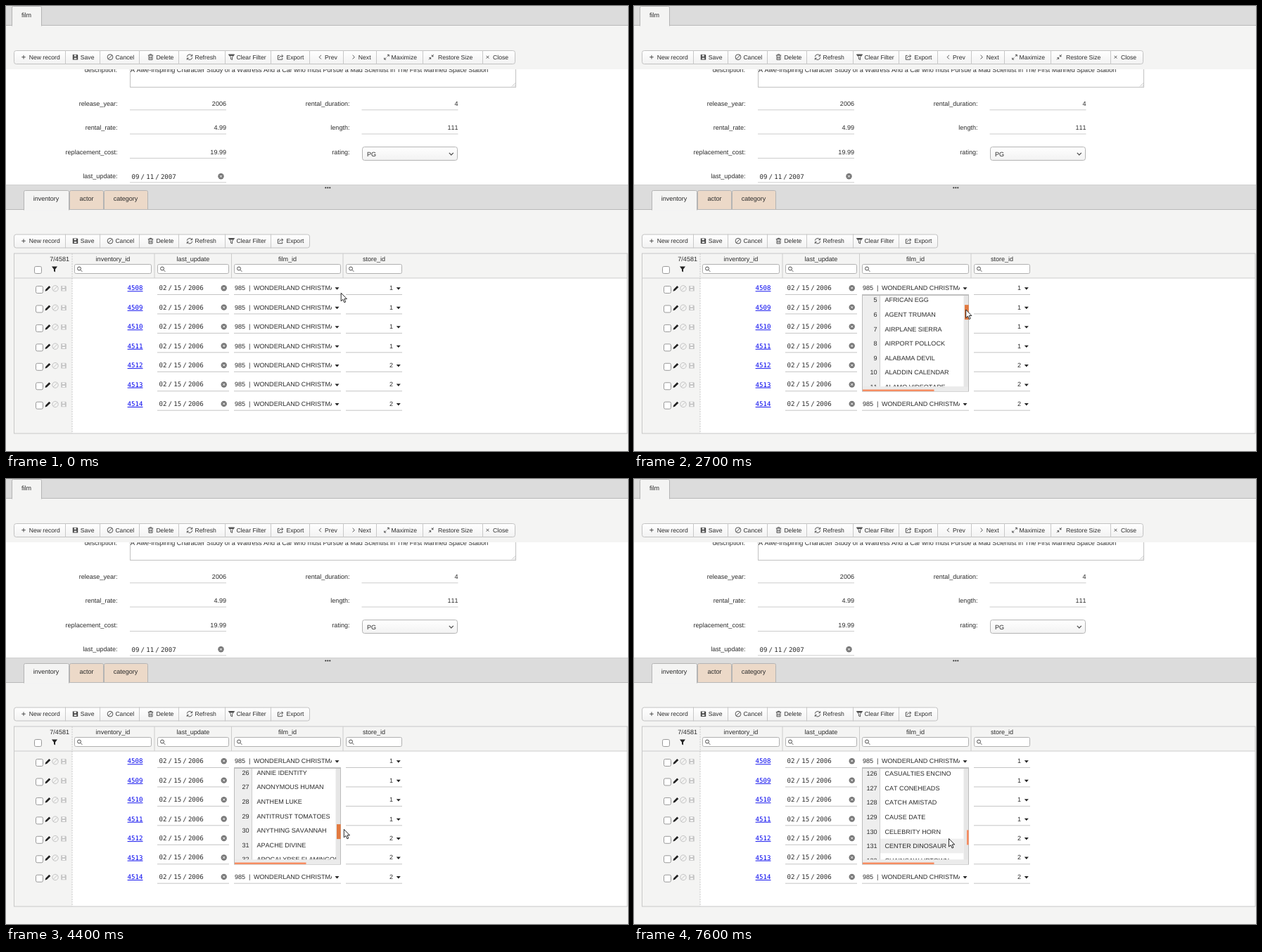
Write an HTML page that moves like this. It is 884x633 px and loops after 8000 ms.

```html
<!DOCTYPE html>
<html lang="en">
<head>
<meta charset="utf-8">
<title>film</title>
<style>
  html, body { margin: 0; width: 100%; height: 100%; overflow: hidden; background: #f4f4f3; }
  svg { display: block; font: 9.05px "Liberation Sans", Arial, sans-serif; font-kerning: none; fill: #2b2b2b; text-rendering: geometricPrecision; }
  text { white-space: pre; }
  .mono { font-family: "DejaVu Sans Mono", monospace; font-size: 9.1px; }
  .link { fill: #00e; text-decoration: underline; }
  .btn { font-size: 8.65px; }
  .ico { fill: none; stroke: #444; stroke-width: 1; }
  .dim { fill: none; stroke: #c4c4c4; stroke-width: 1; }
</style>
</head>
<body>
<svg id="stage" width="884" height="633" viewBox="0 0 884 633">
  <defs>
    <linearGradient id="shade" x2="0" y2="1"><stop stop-color="#fff"/><stop offset="1" stop-color="#f2f2f2"/></linearGradient>
    <clipPath id="form"><rect y="90" width="884" height="165"/></clipPath>
    <clipPath id="combo"><rect x="324" y="388" width="139" height="220"/></clipPath>
    <clipPath id="view"><rect x="325" y="412" width="144" height="129.5"/></clipPath>
  </defs>
</svg>
<script>
const ROW = 20.6, TOP = 412, LOOP = 8000;
const titles = `ACADEMY DINOSAUR,ACE GOLDFINGER,ADAPTATION HOLES,AFFAIR PREJUDICE,AFRICAN EGG,AGENT TRUMAN,AIRPLANE SIERRA,AIRPORT POLLOCK,ALABAMA DEVIL,ALADDIN CALENDAR,ALAMO VIDEOTAPE,ALASKA PHANTOM,ALI FOREVER,ALICE FANTASIA,ALIEN CENTER,ALLEY EVOLUTION,ALONE TRIP,ALTER VICTORY,AMADEUS HOLY,AMELIE HELLFIGHTERS,AMERICAN CIRCUS,AMISTAD MIDSUMMER,ANACONDA CONFESSIONS,ANALYZE HOOSIERS,ANGELS LIFE,ANNIE IDENTITY,ANONYMOUS HUMAN,ANTHEM LUKE,ANTITRUST TOMATOES,ANYTHING SAVANNAH,APACHE DIVINE,APOCALYPSE FLAMINGOS,APOLLO TEEN,ARABIA DOGMA,ARACHNOPHOBIA ROLLERCOASTER,ARGONAUTS TOWN,ARIZONA BANG,ARK RIDGEMONT,ARMAGEDDON LOST,ARMY FLINTSTONES,ARSENIC INDEPENDENCE,ARTIST COLDBLOODED,ATLANTIS CAUSE,ATTACKS HATE,ATTRACTION NEWTON,AUTUMN CROW,BABY HALL,BACKLASH UNDEFEATED,BADMAN DAWN,BAKED CLEOPATRA,BALLOON HOMEWARD,BALLROOM MOCKINGBIRD,BANG KWAI,BANGER PINOCCHIO,BARBARELLA STREETCAR,BAREFOOT MANCHURIAN,BASIC EASY,BEACH HEARTBREAKERS,BEAR GRACELAND,BEAST HUNCHBACK,BEAUTY GREASE,BED HIGHBALL,BEDAZZLED MARRIED,BEETHOVEN EXORCIST,BEHAVIOR RUNAWAY,BENEATH RUSH,BERETS AGENT,BETRAYED REAR,BEVERLY OUTLAW,BIKINI BORROWERS,BILKO ANONYMOUS,BILL OTHERS,BINGO TALENTED,BIRCH ANTITRUST,BIRD INDEPENDENCE,BIRDCAGE CASPER,BIRDS PERDITION,BLACKOUT PRIVATE,BLADE POLISH,BLANKET BEVERLY,BLINDNESS GUN,BLOOD ARGONAUTS,BLUES INSTINCT,BOILED DARES,BONNIE HOLOCAUST,BOOGIE AMELIE,BOONDOCK BALLROOM,BORN SPINAL,BORROWERS BEDAZZLED,BOULEVARD MOB,BOUND CHEAPER,BOWFINGER GABLES,BRANNIGAN SUNRISE,BRAVEHEART HUMAN,BREAKFAST GOLDFINGER,BREAKING HOME,BRIDE INTRIGUE,BRIGHT ENCOUNTERS,BRINGING HYSTERICAL,BROOKLYN DESERT,BROTHERHOOD BLANKET,BUBBLE GROSSE,BUCKET BROTHERHOOD,BUGSY SONG,BULL SHAWSHANK,BULWORTH COMMANDMENTS,BUNCH MINDS,BUTCH PANTHER,BUTTERFLY CHOCOLAT,CABIN FLASH,CADDYSHACK JEDI,CALENDAR GUNFIGHT,CALIFORNIA BIRDS,CAMELOT VACATION,CAMPUS REMEMBER,CANDIDATE PERDITION,CANDLES GRAPES,CANYON STOCK,CAPER MOTIONS,CARIBBEAN LIBERTY,CAROL TEXAS,CARRIE SONGS,CASABLANCA SUPER,CASPER DRAGONFLY,CASSIDY WYOMING,CASUALTIES ENCINO,CAT CONEHEADS,CATCH AMISTAD,CAUSE DATE,CELEBRITY HORN,CENTER DINOSAUR,CHAINSAW UPTOWN`.split(",");

// Drawing helpers; y of text is its visual middle.
const rect = (x, y, w, h, fill, extra = "") => `<rect x="${x}" y="${y}" width="${w}" height="${h}" fill="${fill}" ${extra}/>`;
const box = (x, y, w, h, fill, line = "#c2c2c2", r = 0) => rect(x + .5, y + .5, w - 1, h - 1, fill, `stroke="${line}" rx="${r}"`);
const line = (x1, y1, x2, y2, color = "#ccc", extra = "") => `<path d="M${x1} ${y1}L${x2} ${y2}" stroke="${color}" ${extra}/>`;
const text = (x, y, s, anchor = "start", cls = "") => `<text x="${x}" y="${y + 3.2}" text-anchor="${anchor}" class="${cls}">${s}</text>`;
const at = (x, y, s, cls = "ico", scale = 1) => `<g transform="translate(${x} ${y}) scale(${scale})" class="${cls}">${s}</g>`;
const path = (d, extra = "") => `<path d="${d}" ${extra}/>`;

const SOLID = 'fill="#444" stroke="none"';
const icons = {
  plus: path("M-3 0H3M0-3V3"),
  save: path("M-4-4H3L4-3V4H-4Z", SOLID) + rect(-2, -3.3, 3.6, 2.3, "#fff", 'stroke="none"') + rect(-2, 1, 4, 2, "#fff", 'stroke="none"'),
  ban: '<circle r="4.2"/>' + path("M-2.9 2.9L2.9-2.9"),
  trash: path("M-4-2.8H4M-1.5-3V-4.2H1.5V-3M-2.8-2.5V4H2.8V-2.5M-1-.8V2.5M1-.8V2.5"),
  refresh: path("M-4-.5A4 4 0 0 1 3.4-2.2M4 .5A4 4 0 0 1-3.4 2.2M4-4.2V-1.6H1.4M-4 4.2V1.6H-1.4"),
  filter: path("M-4.5-4H4.5L1.2 0V4L-1.2 3V0Z") + path("M-4-3.8H4L2.5-1.8H-2.5Z", SOLID),
  share: path("M-1.5-2.5H-4V3.8H3V1.5M-2 1.5C-1.5-1 0-1.6 3.5-1.6M1.8-3.8L4.2-1.6L1.8.6"),
  prev: path("M1.5-3L-1.5 0L1.5 3"),
  next: path("M-1.5-3L1.5 0L-1.5 3"),
  grow: path("M.8-.8L3.4-3.4M1-3.6H3.6V-1M-.8.8L-3.4 3.4M-1 3.6H-3.6V1"),
  shrink: path("M3.8-3.8L1-1M1-3.4V-1H3.4M-3.8 3.8L-1 1M-1 3.4V1H-3.4"),
  close: path("M-2-2L2 2M-2 2L2-2"),
  pencil: path("M-4 4L-3.2 1.4L1.8-3.6L3.8-1.6L-1.4 3.3Z", 'fill="#222" stroke="none"')
};
const clearIcon = (x, y) => `<circle cx="${x}" cy="${y}" r="4.2" fill="#777"/>` + at(x, y, path("M-1.5-1.5L1.5 1.5M-1.5 1.5L1.5-1.5", 'stroke="#fff"'));
const caret = (x, y, id = "") => path(`M${x - 3} ${y - 1}h6l-3 3.4Z`, `fill="#222" ${id}`);
const check = (x, y) => rect(x, y, 10, 10, "#fff", 'stroke="#999" rx="2"');
const date = (x, y, parts) => parts.map((p, i) => text(x + i * 20.7, y, p, "start", "mono") + (i < 2 ? text(x + 15.7 + i * 20.7, y, "/", "middle", "mono") : "")).join("");

// icon, label, right edge, icon x, label x
const buttons = [
  ["plus", "New record", 85, 25, 32.7], ["save", "Save", 134, 98.5, 105.8], ["ban", "Cancel", 190, 148, 155.4],
  ["trash", "Delete", 246, 205.5, 213.4], ["refresh", "Refresh", 312, 261, 268.6], ["filter", "Clear Filter", 377, 320.5, 327.4],
  ["share", "Export", 432, 390, 398.5], ["prev", "Prev", 480, 446.5, 453], ["next", "Next", 527, 494, 500.8],
  ["grow", "Maximize", 593, 541, 547.6], ["shrink", "Restore Size", 678, 604.5, 614], ["close", "Close", 724, 684.5, 692]
];
function toolbar(y, count) {
  const list = buttons.slice(0, count), end = list[count - 1][2];
  return box(11, y, end - 11, 20, "url(#shade)", "#c2c2c2", 3) + list.map(([ico, label, edge, ix, tx], i) =>
    (i < count - 1 ? line(edge - .5, y, edge - .5, y + 20, "#c8c8c8") : "") + at(ix, y + 9.7, icons[ico], "ico", .92) + text(tx, y + 9.6, label, "start", "btn")).join("");
}

const tab = (x1, x2, y, bottom, fill) => path(`M${x1 + .5} ${bottom}V${y + 2.5}q0-2 2-2H${x2 - 2.5}q2 0 2 2V${bottom}`, `fill="${fill}" stroke="#b4b4b4"`);
const field = (label, value, right, x, y) => text(right, y, label + ":", "end") + line(x, y + 9, x + 137, y + 9) + (value ? text(x + 137, y, value, "end") : "");

function page() {
  let s = rect(0, 0, 884, 633, "#f4f4f3") + rect(0, 0, 884, 27, "#dcdcdc") + line(0, 27.5, 884, 27.5, "#b8b8b8")
    + tab(8, 51, 0, 28.5, "#f4f4f3") + text(29, 12.5, "film", "middle") + toolbar(63, 12);

  s += rect(0, 90, 884, 164.5, "#fff") + `<g clip-path="url(#form)">` + box(176, 70, 549, 46, "#fff")
    + path("M719 114.5L724 109.5M722 114.5L724 112.5", 'stroke="#aaa" stroke-width=".7"') + text(158, 90.5, "description:", "end")
    + text(177, 91, "A Awe-Inspiring Character Study of a Waitress And a Car who must Pursue a Mad Scientist in The First Manned Space Station") + "</g>"
    + field("release_year", "2006", 158.5, 176, 138.8) + field("rental_rate", "4.99", 158.5, 176, 173)
    + field("replacement_cost", "19.99", 158.5, 176, 207.5) + field("last_update", "", 158.5, 176, 242)
    + field("rental_duration", "4", 488.5, 505.5, 138.8) + field("length", "111", 488.5, 505.5, 173)
    + text(488.5, 207.5, "rating:", "end") + box(506, 200, 136, 20, "url(#shade)", "#b4b4b4", 3) + text(513, 210.3, "PG")
    + path("M629.8 208.8L632.8 211.8L635.8 208.8", 'fill="none" stroke="#444" stroke-width="1.2"')
    + date(178.5, 242.5, ["09", "11", "2007"]) + clearIcon(305.5, 242.3);

  s += rect(0, 254.5, 884, 35.5, "#dcdcdc") + line(0, 254.5, 884, 254.5, "#d0d0d0")
    + [454.3, 457.3, 460.3].map(x => `<circle cx="${x}" cy="258.5" r="1.1"/>`).join("")
    + tab(90, 139, 262, 290, "#ecd9c8") + tab(139, 202, 262, 290, "#ecd9c8") + line(0, 289.5, 884, 289.5, "#b8b8b8")
    + tab(25, 90, 262, 290.5, "#f4f4f3")
    + [[57, "inventory"], [114.5, "actor"], [170, "category"]].map(([x, t]) => text(x, 273.6, t, "middle")).join("")
    + toolbar(324.5, 7);

  s += rect(94, 387, 789, 221, "#fff") + box(11, 351.5, 872.5, 257, "none", "#c8c8c8") + line(11, 387, 883, 387)
    + line(94, 352, 94, 608, "#c8c8c8", 'stroke-dasharray="2 1.5"')
    + [211, 320.5, 479].map(x => line(x, 352, x, 387)).join("")
    + text(90, 359.3, "7/4581", "end") + check(40.5, 370.5) + path("M65 370.5H73L70 374.5V378.5L68 377.2V374.5Z", 'fill="#222"')
    + [["inventory_id", 152, 97, 110], ["last_update", 266, 215, 102], ["film_id", 400, 324, 152], ["store_id", 523, 483, 80]].map(([t, mid, x, w]) =>
      text(mid, 359.3, t, "middle") + box(x, 367, w, 14, "#fff", "#b0b0b0", 2)
      + at(x + 7.5, 374, '<circle cx="-.5" cy="-.5" r="2.6"/>' + path("M1.5 1.5L4 4"), "ico", .95)).join("");

  for (let i = 0; i < 7; i++) {
    const y = 401 + i * 27.45;
    s += check(42.5, y - 2.5) + at(59.5, y + .7, icons.pencil) + at(70, y + .8, icons.ban, "dim")
      + at(82, y + .8, icons.save.replace("#444", "#c4c4c4"), "dim", .95)
      + text(194.5, y + .2, 4508 + i, "end", "mono link")
      + date(217.5, y, ["02", "15", "2006"]) + clearIcon(309.7, y + .2)
      + `<g clip-path="url(#combo)">${text(325, y, "985")}${text(346.2, y, "|", "middle")}${text(352, y, "WONDERLAND CHRISTMAS")}</g>`
      + caret(470.5, y + .3, i ? "" : 'id="arrow"') + text(550, y, i < 4 ? 1 : 2, "end") + caret(557.8, y + .3)
      + [[215, 317], [324, 476], [483, 563]].map(([a, b]) => line(a, y + 9.5, b, y + 9.5, "#c4c4c4")).join("");
  }
  return s;
}

const popup = () => `<g id="popup">` + box(324, 411, 152, 137.5, "#e6e6e6", "#bcbcbc")
  + rect(325, 412, 25, 129.5, "#eee") + rect(350, 412, 118.5, 129.5, "#fff") + line(349.5, 412, 349.5, 541.5, "#ccc")
  + `<g clip-path="url(#view)"><g id="list">` + rect(350, 0, 118.5, ROW, "#eee", 'id="hover"')
  + titles.map((t, i) => text(345.5, (i + .5) * ROW, i + 1, "end") + text(356.5, (i + .5) * ROW, t)).join("")
  + "</g></g>" + rect(325, 541.5, 150, 6.5, "#ebebeb") + rect(325, 545.5, 101.5, 2.5, "#f68d62") + rect(473, TOP, 2.7, 21, "#f68d62", 'id="thumb"') + "</g>";

const cursor = () => path("M0 0V11.6L2.7 9.2L4.6 13.5L6.5 12.7L4.6 8.5H8.2Z", 'id="cursor" fill="#fff" stroke="#111" stroke-width=".9"');

stage.insertAdjacentHTML("beforeend", page() + popup() + cursor());
const [arrow, popupEl, list, hover, thumb, cursorEl] = ["arrow", "popup", "list", "hover", "thumb", "cursor"].map(id => document.getElementById(id));

// Tables of [time, value...]
const pointer = [[0, 476.2, 408.2], [300, 469.7, 402], [1100, 469.7, 402], [1200, 462, 406], [1300, 464, 413], [1600, 473, 419],
  [2200, 473, 419], [2700, 471.7, 432], [3100, 472.5, 449], [3500, 474.3, 466], [4000, 477.5, 485], [4400, 480.3, 498.3],
  [4900, 478.5, 510], [5200, 477, 506], [5600, 475.3, 498.3], [6300, 475.3, 498.3], [6400, 467, 506], [6600, 453.5, 517.5], [7200, 447.5, 511.5]];
const bar = [[0, 0], [2200, 0], [2700, 13.15], [3100, 30], [3500, 46.5], [4000, 66], [4400, 79.1], [4900, 91], [5200, 87], [5400, 82], [5600, 79.1], [6600, 79.1], [7200, 87.4]];
const ratio = [[0, 6.57], [5000, 14.2], [5200, 21.9], [5400, 29.5]];
const hovered = [[0, 0], [1300, 1], [2100, 0], [6400, 118], [6500, 119], [7600, 131]];

const step = (table, t) => table.filter(k => k[0] <= t).pop()[1];
function mix(table, t) {
  const i = table.findIndex(k => k[0] > t);
  if (i < 0) return table[table.length - 1].slice(1);
  const a = table[i - 1], b = table[i], p = (t - a[0]) / (b[0] - a[0]);
  return a.slice(1).map((v, n) => v + (b[n + 1] - v) * p);
}

function draw(now) {
  const t = Math.floor(now % LOOP / 100) * 100;
  const [x, y] = mix(pointer, t), [pos] = mix(bar, t), row = step(hovered, t);
  const wide = t >= 2100 && t < 6400;
  cursorEl.setAttribute("transform", `translate(${x} ${y})`);
  arrow.setAttribute("fill", t >= 600 && t < 800 ? "#888" : "#222");
  popupEl.style.display = t < 800 ? "none" : "";
  list.setAttribute("transform", `translate(0 ${TOP - pos * step(ratio, t)})`);
  hover.style.display = row ? "" : "none";
  hover.setAttribute("y", (row - 1) * ROW);
  thumb.setAttribute("y", TOP + pos);
  thumb.setAttribute("x", wide ? 470 : 473);
  thumb.setAttribute("width", wide ? 5.7 : 2.7);
  thumb.setAttribute("fill", wide ? "#e27a40" : "#f68d62");
}

const start = performance.now();
(function tick() {
  draw(performance.now() - start);
  requestAnimationFrame(tick);
})();
</script>
</body>
</html>
```
